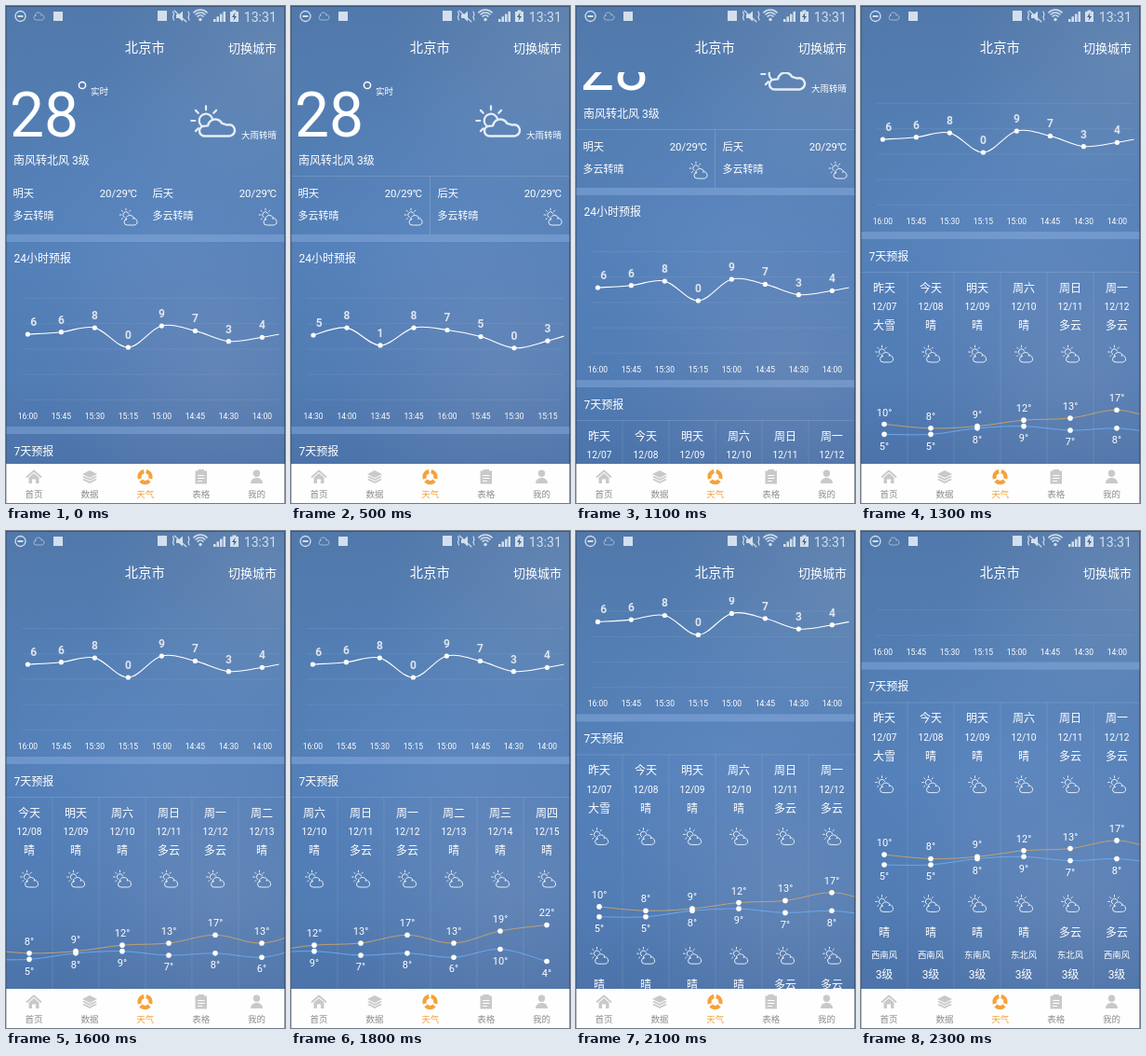
Recreate the animation shown at these times as an HTML page with a canvas. Size 300 px wide and 533 px high, loop 2.4 s.

```html
<!DOCTYPE html>
<html lang="zh-CN">
<head>
<meta charset="utf-8">
<title>天气</title>
<style>
html, body { margin: 0; width: 100%; height: 100%; overflow: hidden; background: #5079b0; }
canvas { display: block; width: 300px; height: 533px; }
</style>
</head>
<body>
<canvas id="stage"></canvas>
<script>
const W = 300, H = 533, LOOP = 2400, STEP = 100, TAU = Math.PI * 2;
const FONT = 'Roboto, "Noto Sans CJK SC", "Noto Sans CJK", sans-serif';
const canvas = document.getElementById('stage');
const c = canvas.getContext('2d');
const dpr = window.devicePixelRatio || 1;
canvas.width = W * dpr;
canvas.height = H * dpr;

const clock = ['16:00', '15:45', '15:30', '15:15', '15:00', '14:45', '14:30', '14:00', '13:45', '13:45'];
const hourly = [5.5, 6.4, 8.2, 0, 9, 6.9, 2.5, 4.2, 6.8, 3.1, 1.8, 5, 7.7, 8.6,
  4, 2.2, 5.1, 8.2, .8, 8.2, 7.25, 4.5, -.3, 2.7, 7];
const dayNames = ['昨天', '今天', '明天', '周六', '周日', '周一', '周二', '周三', '周四'];
const highs = [10, 8, 9, 12, 13, 17, 13, 19, 22];
const lows = [5, 5, 8, 9, 7, 8, 6, 10, 4];
const winds = ['西南风', '西南风', '东南风', '东北风', '东北风', '西南风', '西南风', '东南风', '东北风'];
const sky = i => i === 4 || i === 5 ? '多云' : '晴';

// Piecewise linear track of [time, value] keys
function track(t, keys) {
  let i = 0;
  while (i < keys.length - 1 && t >= keys[i + 1][0]) i++;
  const [t0, v0] = keys[i];
  const [t1, v1] = keys[i + 1] || [t0 + 1, v0];
  return v0 + (v1 - v0) * Math.max(0, t - t0) / (t1 - t0);
}
const scrollKeys = [[1000, 0], [1100, 50], [1200, 145], [1300, 209], [2000, 209], [2100, 254.6], [2300, 310.4]];
const hourKeys = [[200, 0], [500, 16], [900, 0]];
const dayKeys = [[1500, 0], [1600, 50], [1700, 120], [1800, 150], [2100, 0]];

function text(s, x, y, size, align = 'left', color = '#fff', weight = 400) {
  c.font = `${weight} ${size}px ${FONT}`;
  c.textAlign = align;
  c.fillStyle = color;
  c.fillText(s, x, y + size * .365);
}
function rect(x, y, w, h, color) {
  c.fillStyle = color;
  c.fillRect(x, y, w, h);
}
function dot(x, y, r, color = '#fff') {
  c.fillStyle = color;
  c.beginPath();
  c.arc(x, y, r, 0, TAU);
  c.fill();
}
function stroke(color, width) {
  c.strokeStyle = color;
  c.lineWidth = width;
  c.stroke();
}
function poly(points, color) {
  c.fillStyle = color;
  c.beginPath();
  points.forEach(p => c.lineTo(...p));
  c.closePath();
  c.fill();
}
function clipped(x, y, w, h, paint) {
  c.save();
  c.beginPath();
  c.rect(x, y, w, h);
  c.clip();
  paint();
  c.restore();
}
function curve(points, color, width) {
  const at = i => points[Math.max(0, Math.min(points.length - 1, i))];
  c.beginPath();
  c.moveTo(...points[0]);
  for (let i = 0; i < points.length - 1; i++) {
    const [a, b, d, e] = [at(i - 1), at(i), at(i + 1), at(i + 2)];
    c.bezierCurveTo(b[0] + (d[0] - a[0]) / 6, b[1] + (d[1] - a[1]) / 6,
      d[0] - (e[0] - b[0]) / 6, d[1] - (e[1] - b[1]) / 6, d[0], d[1]);
  }
  stroke(color, width);
}

function cloud(x, y, w, h, color, width) {
  c.beginPath();
  c.arc(x + .3 * h, y + .7 * h, .3 * h, 1.57, 4.7);
  c.arc(x + .45 * w, y + .45 * h, .45 * h, 3.3, 5.8);
  c.arc(x + w - .34 * h, y + .66 * h, .34 * h, 4.4, 7.85);
  c.closePath();
  stroke(color, width);
}
function sun(x, y, r, width, color) {
  c.beginPath();
  c.arc(x, y, r, 2.2, 6);
  for (let i = 3; i <= 7; i++) {
    const dx = Math.cos(i * Math.PI / 4), dy = Math.sin(i * Math.PI / 4);
    c.moveTo(x + dx * r * 1.6, y + dy * r * 1.6);
    c.lineTo(x + dx * r * 2.15, y + dy * r * 2.15);
  }
  stroke(color, width);
}
function smallWeather(x, y) {
  const color = 'rgba(255,255,255,.85)';
  sun(x - 2.5, y - 2.5, 3.2, 1, color);
  cloud(x - 4.5, y - 2, 14, 10.5, color, 1);
}

function glow(x, y, r, color, alpha) {
  const g = c.createRadialGradient(x, y, 0, x, y, r);
  g.addColorStop(0, `rgba(${color},${alpha})`);
  g.addColorStop(1, `rgba(${color},0)`);
  rect(0, 0, W, H, g);
}
function backdrop() {
  const g = c.createLinearGradient(0, 0, 30, H);
  ['#5178aa', '#537eb3', '#5480b9', '#517cb4', '#4a70a5'].forEach((s, i) => g.addColorStop(i / 4, s));
  rect(0, 0, W, H, g);
  glow(290, 60, 190, '140,160,190', .3);
  glow(170, 230, 170, '110,150,205', .25);
  glow(230, 390, 190, '130,150,188', .35);
}

function current() {
  text('28', 4, 116, 66);
  c.beginPath();
  c.arc(82, 85, 3.6, 0, TAU);
  stroke('#fff', 1.5);
  text('实时', 91, 92, 9.5);
  text('南风转北风 3级', 8, 166, 12);
  sun(215, 123, 7.3, 2.2, '#e6edf6');
  cloud(208, 121.5, 38, 18, '#e6edf6', 2.4);
  text('大雨转晴', 291, 139, 9.5, 'right');
  ['明天', '后天'].forEach((name, i) => {
    const x = i * 150;
    text(name, x + 7.5, 201, 11.3);
    text('20/29℃', x + 141, 201, 11.4, 'right');
    text('多云转晴', x + 7.5, 225, 11);
    smallWeather(x + 131.5, 226.5);
  });
}

function hours(first) {
  text('24小时预报', 8.5, 271, 12);
  for (let i = 0; i < 5; i++) rect(17, 313 + i * 27.2, 276, 1, 'rgba(255,255,255,.07)');
  const points = hourly.slice(first, first + 9).map((v, i) =>
    [23.4 + i * 36 + (first ? .6 : 0), 366 - v * 2.55]);
  clipped(17, 290, 276.5, 160, () => curve(points, '#fff', 1.1));
  points.slice(0, 8).forEach(([x, y], i) => {
    const value = Math.abs(Math.round(hourly[first + i]));
    dot(x, y, 2.6);
    text(value, x + (i ? 0 : 6.3), y - 13.5, 12, 'center', '#dfe5ee', 700);
    text(clock[(first + i) % 10], x, 439.8, 8.5, 'center');
  });
}

function days(shift) {
  const tempY = v => 679.2 - v * 2.17;
  const x = i => 25 + i * 50 - shift;
  const line = values => values.map((v, i) => [x(i), tempY(v)]);
  text('7天预报', 8.5, 477.5, 12);
  rect(0, 494, W, 1, 'rgba(255,255,255,.13)');
  curve(line(highs), '#c0a272', 1);
  curve(line(lows), '#69a9ee', 1);
  dayNames.forEach((name, i) => {
    const cx = x(i), put = (s, y, size) => text(s, cx, y, size, 'center');
    rect(cx + 24.5, 494, 1, 320, 'rgba(255,255,255,.1)');
    put(name, 511.3, 12);
    put('12/' + String(7 + i).padStart(2, '0'), 531.5, 10.2);
    put(i ? sky(i) : '大雪', 552, 12);
    smallWeather(cx, 582.5);
    dot(cx, tempY(highs[i]), 2.8);
    dot(cx, tempY(lows[i]), 2.8);
    put(highs[i] + '°', tempY(highs[i]) - 13, 11);
    put(lows[i] + '°', tempY(lows[i]) + 12.3, 11);
    smallWeather(cx, 710.3);
    put(sky(i), 741.3, 12);
    put(winds[i], 765.3, 9.4);
    put('3级', 786.3, 12);
  });
}

function statusBar() {
  const ink = '#d3dfec';
  c.beginPath();
  c.arc(15.5, 11, 5.5, 0, TAU);
  stroke(ink, 1.3);
  rect(12.5, 10, 6, 2, ink);
  cloud(30, 7, 11, 8, 'rgba(211,223,236,.6)', 1);
  rect(51, 6, 10, 10, ink);
  rect(163, 5, 10, 11, ink);
  // muted speaker between vibration marks
  poly([[183, 9], [186, 9], [190, 5.5], [190, 16.5], [186, 13], [183, 13]], ink);
  c.beginPath();
  c.moveTo(181, 5);
  c.lineTo(194, 17);
  [179.5, 196].forEach(x => {
    c.moveTo(x, 6);
    c.lineTo(x + 1, 9);
    c.lineTo(x, 12);
    c.lineTo(x + 1, 15);
  });
  stroke(ink, 1.1);
  for (const r of [4, 7, 10]) {
    c.beginPath();
    c.arc(209, 14, r, -2.35, -.79);
    stroke(ink, 1.6);
  }
  dot(209, 14.5, 1.7, ink);
  for (let i = 0; i < 4; i++) rect(223 + i * 3.5, 14 - i * 2.7, 2.5, 3 + i * 2.7, ink);
  rect(241, 6, 9, 11, ink);
  rect(243.5, 4.5, 4, 2, ink);
  poly([[246.5, 7], [243, 12], [245.3, 12], [244.5, 16], [248, 11], [245.8, 11]], '#45668f');
  text('13:31', 291, 11.8, 14.2, 'right', ink);
}

function tabBar() {
  const grey = '#c9c9c9', orange = '#f5a23a', white = '#fefefe';
  rect(0, 491, W, 42, white);
  ['首页', '数据', '天气', '表格', '我的'].forEach((s, i) =>
    text(s, 30 + i * 59.9, 524, 9.5, 'center', i === 2 ? orange : '#8c8c8c'));

  c.beginPath();
  c.moveTo(22.5, 505);
  c.lineTo(30, 498.5);
  c.lineTo(37.5, 505);
  stroke(grey, 1.8);
  poly([[30, 501], [35.5, 505.8], [35.5, 512], [32, 512], [32, 507.5], [28, 507.5], [28, 512],
    [24.5, 512], [24.5, 505.8]], grey);

  for (const y of [508, 505, 502]) {
    const sheet = [[90, y - 4], [98, y], [90, y + 4], [82, y]];
    poly(sheet.map(([a, b]) => [a, b + 1]), white);
    poly(sheet, grey);
  }

  // three lobes around an open centre
  for (let i = 0; i < 3; i++) {
    c.save();
    c.translate(149.5, 505);
    c.rotate(i * TAU / 3);
    c.lineCap = 'butt';
    c.beginPath();
    c.arc(0, 0, 6, .72, 2.42);
    stroke(orange, 4.4);
    c.restore();
  }

  rect(203.5, 498.5, 12.5, 14, grey);
  rect(206.5, 497, 6.5, 3, grey);
  for (const y of [503, 506, 509]) rect(206, y, y > 508 ? 5 : 7.5, 1, white);

  dot(269.5, 501.3, 3.7, grey);
  c.beginPath();
  c.moveTo(263, 512);
  c.bezierCurveTo(263, 504, 276, 504, 276, 512);
  c.fill();
}

function draw(t) {
  const scroll = track(t, scrollKeys);
  c.setTransform(dpr, 0, 0, dpr, 0, 0);
  c.lineCap = c.lineJoin = 'round';
  backdrop();
  statusBar();
  text('北京市', 149.3, 45, 14.3, 'center');
  text('切换城市', 291, 45, 13, 'right');
  clipped(0, 71, W, 420, () => {
    c.translate(0, -scroll);
    for (const y of [245, 451]) rect(0, y, W, 8, 'rgba(150,185,230,.38)');
    if (t >= 300) {
      rect(0, 182, W, 1, 'rgba(255,255,255,.14)');
      rect(149, 182, 1, 63, 'rgba(255,255,255,.16)');
    }
    current();
    hours(Math.round(track(t, hourKeys)));
    days(track(t, dayKeys));
  });
  tabBar();
  // thin dark rim of the screen
  c.beginPath();
  c.rect(.5, .5, W - 1, H + 1);
  stroke('rgba(30,40,60,.45)', 1);
}

function tick() {
  const t = performance.now() % LOOP;
  draw(Math.floor(t / STEP) * STEP);
  requestAnimationFrame(tick);
}
tick();
</script>
</body>
</html>
```
